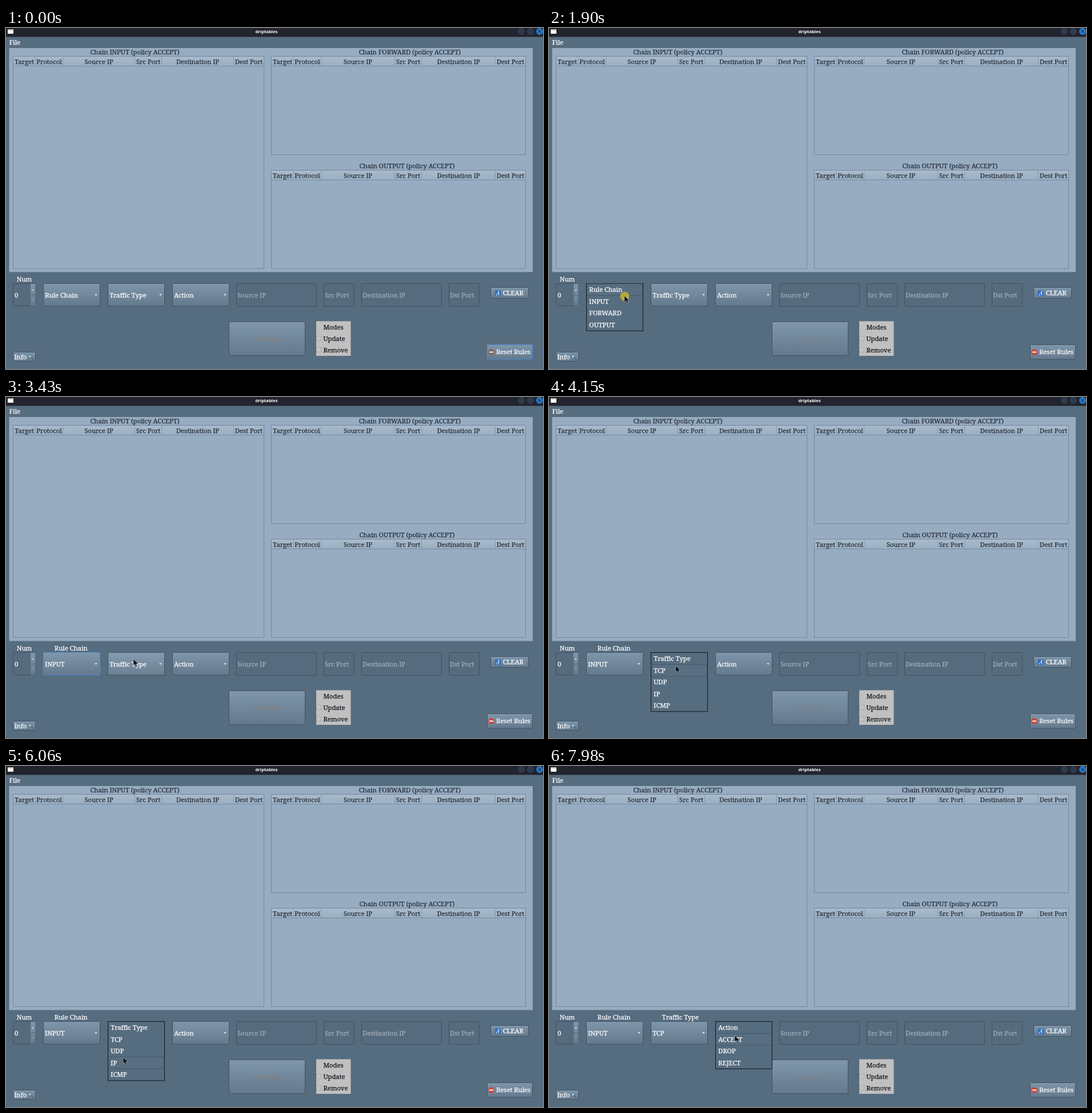
An HTML page for the animation above (8 s loop, 940 by 596 pixels).

```html
<!DOCTYPE html>
<html lang="en">
<head>
<meta charset="utf-8">
<title>driptables</title>
<style>
  html, body { margin: 0; width: 100%; height: 100%; overflow: hidden; background: #566c7f; }
  svg { display: block; width: 100%; height: 100%; }
  text {
    font: 500 11.4px "Noto Serif", serif; letter-spacing: -.1px; white-space: pre;
    color: #fff; fill: currentColor; stroke: currentColor; stroke-width: .25px;
  }
  .dark { color: #27303d; }
  .black { color: #14181e; }
  .hint { color: #a1aeba; }
  .off { color: #7f8083; }
  .title { font: 700 7.7px "Noto Sans", sans-serif; letter-spacing: 0; stroke: none; }
</style>
</head>
<body>
<svg id="stage" viewBox="0 0 940 596">
  <defs>
    <linearGradient id="btn" x2="0" y2="1">
      <stop stop-color="#7f96ab"/><stop offset="1" stop-color="#64798c"/>
    </linearGradient>
    <linearGradient id="head" x2="0" y2="1">
      <stop stop-color="#a8bacb"/><stop offset="1" stop-color="#9bafc2"/>
    </linearGradient>
  </defs>
</svg>
<script>
const LOOP = 8000, TOP = 446, ROW = 20.5;
const EDGE = '#3f5365', FOCUS = '#4f8bd6';
const stage = document.getElementById('stage');

function el(tag, attrs, parent = stage) {
  const node = document.createElementNS('http://www.w3.org/2000/svg', tag);
  for (const k in attrs) node.setAttribute(k, attrs[k]);
  return parent.appendChild(node);
}
const box = (x, y, width, height, fill, stroke = 'none', parent, rx = 0) =>
  el('rect', { x, y, width, height, fill, stroke, rx }, parent);
const shape = (d, fill, stroke = 'none', parent) => el('path', { d, fill, stroke }, parent);
const dot = (cx, cy, r, fill, stroke = 'none', parent) => el('circle', { cx, cy, r, fill, stroke }, parent);
function label(str, x, y, cls = '', anchor = 'start', parent) {
  const node = el('text', { x, y, class: cls, 'text-anchor': anchor }, parent);
  node.textContent = str;
  return node;
}
const show = (node, on) => node.setAttribute('visibility', on ? 'visible' : 'hidden');
const button = (x, y, w, h) => box(x, y, w, h, 'url(#btn)', EDGE, stage, 1);

function table(name, middle, y, bottom, edges) {
  const x = edges[0], right = edges[edges.length - 1];
  const heads = ['Target', 'Protocol', 'Source IP', 'Src Port', 'Destination IP', 'Dest Port'];
  label(`Chain ${name} (policy ACCEPT)`, middle, y - 3.5, 'dark', 'middle');
  box(x, y, right - x, bottom - y, '#97acc1', '#7288a0');
  box(x + .5, y + .5, right - x - 1, 17, 'url(#head)');
  shape(`M${x} ${y + 17}H${right}`, 'none', '#768ca2');
  heads.forEach((h, i) => {
    label(h, (edges[i] + edges[i + 1]) / 2, y + 13.2, 'dark', 'middle');
    if (i) shape(`M${edges[i]} ${y + 1}v16`, 'none', '#8499ae');
  });
}

function field(hint, x, w) {
  box(x, 446.5, w, 40, '#566b7e', '#405263', stage, 1);
  label(hint, x + 1.5, 470.7, 'hint');
}

// Title bar and menu
box(0, 0, 940, 15.5, '#22242e');
box(3, 2.5, 10, 7.5, '#fff');
box(3, 2.5, 10, 2, '#d9c9b4');
label('driptables', 456, 9, 'title', 'middle');
dot(902, 6, 5.3, '#2b3a4e', '#36465a');
dot(918, 6, 5.3, '#2b3a4e', '#36465a');
dot(934, 6, 6, '#2878c4');
shape('M931.5 3.5l5 5m0-5l-5 5', 'none', '#10202f');
label('File', 5.5, 29.3);

// Rule tables
box(5.5, 35, 916.5, 391.5, '#97acc1');
table('INPUT', 225.5, 49.5, 420.5, [12.5, 51.5, 99.5, 225.5, 272.5, 398.5, 451.5]);
const right = [464.5, 503.5, 551.5, 680.5, 727.5, 856.5, 909.5];
table('FORWARD', 706.8, 49.5, 221.5, right);
table('OUTPUT', 702, 248.5, 420.5, right);

// Number spinner
label('Num', 32, 443.3, '', 'middle');
box(12.5, 446.5, 39, 39, '#566b7e', '#405263', stage, 1);
box(43, 447, 8.5, 38.5, 'url(#btn)');
shape('M43 466.5h8.5', 'none', '#566b7e');
shape('M45 459l2-2.6l2 2.6z', '#dde4ea');
shape('M45 474l2 2.6l2-2.6z', '#93a3b1');
label('0', 15, 470.7);

// Inputs and buttons
field('Source IP', 403.5, 140);
field('Src Port', 556.5, 53);
field('Destination IP', 622.5, 140);
field('Dst Port', 775.5, 53);

button(848.5, 453.5, 66, 19);
box(856, 458.5, 10, 10, '#2f6fbe', 'none', stage, 1);
dot(862.3, 460.9, 1.1, '#fff');
shape('M862.3 462.5v5M862.3 463.5l-2.6 .6M858.6 464.8v2.8', 'none', '#fff');
label('CLEAR', 869.7, 467.3);

button(390.5, 513.5, 133, 59);
label('Add Rule', 457, 546.8, 'off', 'middle');

box(543, 512.5, 60.5, 60.5, '#c0c0c0');
label('Modes', 573, 527, 'black', 'middle');
['Update', 'Remove'].forEach((s, i) => {
  box(543.5, 538.5 + 20 * i, 8, 8, '#c3c4c3', '#a9adad');
  label(s, 555.5, 547 + 20 * i, 'black');
});

button(12.5, 566.5, 39, 16);
label('Info', 14.5, 578.6);
shape('M44 576l4 3.5', 'none', '#3d4650');
dot(42, 574, 2.7, '#9fc6dd', '#5b7487');

const reset = button(842.5, 553.5, 79, 25.5);
const stop = dot(849.5, 566.5, 5, '#d8402f');
box(846, 565.5, 7, 2, '#fff');
label('Reset Rules', 858, 570.3);

// Drop-down lists
const combos = [
  { x: 65.5, name: 'Rule Chain', items: ['INPUT', 'FORWARD', 'OUTPUT'], open: 1900, hover: 2270, pick: 2920, blur: 3680 },
  { x: 178.5, name: 'Traffic Type', items: ['TCP', 'UDP', 'IP', 'ICMP'], open: 3680, hover: 3930, pick: 6740, blur: 7270 },
  { x: 291.5, name: 'Action', items: ['ACCEPT', 'DROP', 'REJECT'], open: 7270, hover: 7530, pick: Infinity, blur: Infinity }
];
for (const c of combos) {
  c.face = button(c.x, 446.5, 99, 39.5);
  c.glow = box(c.x + .5, 447, 98, 38.5, 'rgba(255,255,255,.05)');
  shape(`M${c.x + 89.5} 465.3h5l-2.5 2.8z`, '#e4eaf0');
  c.value = label(c.name, c.x + 2.7, 470.7);
  c.caption = label(c.name, c.x + 19.3, 443.3);
}
for (const c of combos) {
  const rows = [c.name, ...c.items];
  c.list = el('g', {});
  box(c.x, TOP + .5, 99, ROW * rows.length + .8, '#566c7f', '#10161c', c.list);
  c.bar = box(c.x + .8, TOP + 1, 97.4, ROW, '#586e81', '#44586a', c.list);
  rows.forEach((s, i) => label(s, c.x + 4.8, 461.3 + ROW * i, '', 'start', c.list));
}

const ring = dot(0, 0, 8, '#b3aa3c');
const pointer = shape('M0 0V11.5L2.7 9.1L4.6 13.4L6.6 12.5L4.7 8.4H8.5Z', '#0b0d10', '#c3ccd3');
pointer.setAttribute('stroke-width', .6);

// Pointer stops: time, x, y
const path = [
  [450, 143, 602], [1320, 132, 468], [2220, 132, 468], [2470, 126, 477],
  [3130, 126, 477], [3430, 223, 458], [3880, 223, 458], [4750, 217, 508],
  [5240, 217, 508], [5650, 212, 530], [6060, 205, 509], [6480, 205, 477],
  [6880, 205, 477], [7030, 309, 464], [7130, 314, 462], [7480, 314, 462], [7980, 325, 471]
];
const clicks = [[1900, 2020], [2920, 3040], [3680, 3730], [6740, 6860], [7270, 7320]];

function pointerAt(t) {
  const i = path.findIndex(p => p[0] > t);
  if (i === 0) return path[0].slice(1);
  if (i < 0) return path[path.length - 1].slice(1);
  const [t0, x0, y0] = path[i - 1], [t1, x1, y1] = path[i];
  const u = (t - t0) / (t1 - t0), k = u * u * (3 - 2 * u);
  return [x0 + (x1 - x0) * k, y0 + (y1 - y0) * k];
}

function draw(t) {
  const [x, y] = pointerAt(t);
  pointer.setAttribute('transform', `translate(${x} ${y})`);
  ring.setAttribute('cx', x + .5);
  ring.setAttribute('cy', y + 1);
  show(ring, clicks.some(([a, b]) => t >= a && t < b));

  reset.setAttribute('stroke', t < 1900 ? FOCUS : EDGE);
  stop.setAttribute('fill', t < 1900 ? '#8a5a4c' : '#d8402f');

  for (const c of combos) {
    const picked = t >= c.pick;
    c.value.textContent = picked ? c.items[0] : c.name;
    c.face.setAttribute('stroke', picked && t < c.blur ? FOCUS : EDGE);
    show(c.glow, x > c.x && x < c.x + 99 && y > TOP && y < TOP + 40);
    show(c.caption, picked);
    show(c.list, t >= c.open && !picked);
    const row = t < c.hover ? 0 : Math.max(0, Math.min(c.items.length, Math.floor((y - TOP) / ROW)));
    c.bar.setAttribute('y', TOP + 1 + ROW * row);
  }
}

function tick() {
  draw(performance.now() % LOOP);
  requestAnimationFrame(tick);
}
tick();
</script>
</body>
</html>
```
